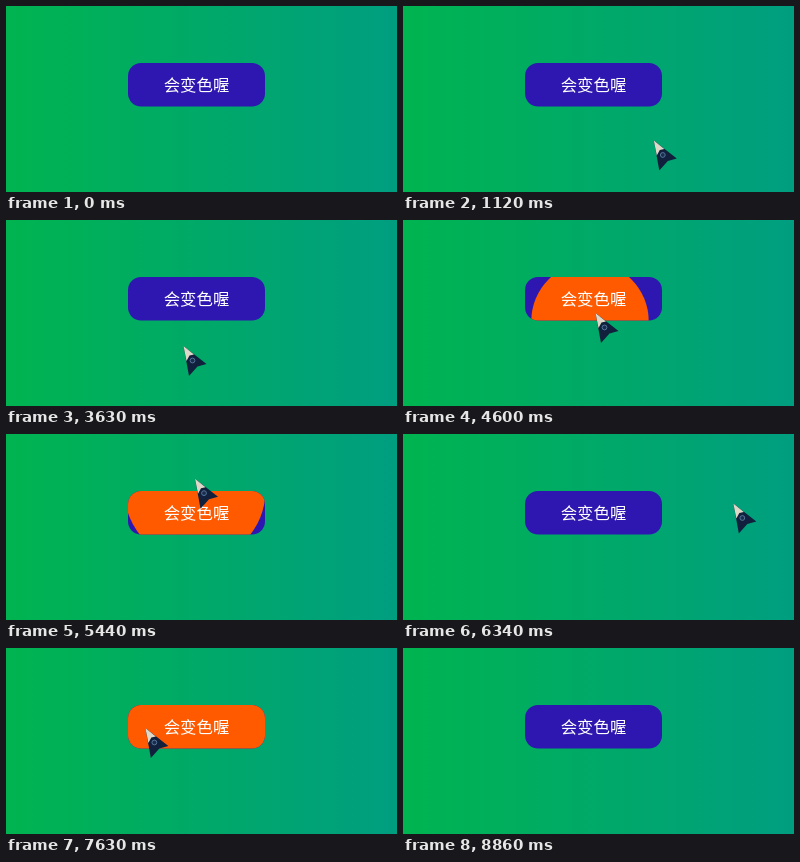
Write an HTML page that moves like this. It is 391 by 186 pixels and loops after 9990 ms.

```html
<!DOCTYPE html>
<html lang="zh">
<head>
<meta charset="utf-8">
<style>
  html, body { margin: 0; width: 100%; height: 100%; overflow: hidden; }
  svg { display: block; width: 391px; height: 186px; }
  text { font: 300 16.4px "Noto Sans CJK SC", "Noto Sans CJK", sans-serif; fill: #fff; text-anchor: middle; }
</style>
</head>
<body>
<svg viewBox="0 0 391 186">
  <defs>
    <linearGradient id="sky">
      <stop offset="0" stop-color="#00b450"/>
      <stop offset="1" stop-color="#009e80"/>
    </linearGradient>
    <clipPath id="pill"><rect x="122" y="57" width="137" height="43.6" rx="13"/></clipPath>
  </defs>
  <rect width="391" height="186" fill="url(#sky)"/>
  <g clip-path="url(#pill)">
    <rect x="122" y="57" width="137" height="44" fill="#2e17b0"/>
    <circle id="ripple" fill="#ff5a00"/>
  </g>
  <text x="190.5" y="85">会变色喔</text>
  <g id="pointer">
    <path d="M-.5 0L22.5 18L13.5 20.5L5 30Z" fill="#11203c"/>
    <path d="M-.5 0L10 8.5L5.5 9.5L2.5 15Z" fill="#ded8c8"/>
    <circle cx="8.5" cy="14.5" r="2.4" fill="#1b2d4d" stroke="#55759a"/>
  </g>
</svg>
<script>
const LOOP = 9990, FADE = 400;
const button = { left: 122, top: 57, right: 259, bottom: 101 };
const RADIUS = (button.right - button.left) * 2.25 / 2;
const ripple = document.getElementById('ripple');
const pointer = document.getElementById('pointer');

// Key points of the pointer tip
const keys = [
  { t: 600, x: 284, y: 192 },
  { t: 1560, x: 226, y: 90 },
  { t: 2510, x: 226, y: 90 },
  { t: 3100, x: 189, y: 101 },
  { t: 3630, x: 178, y: 126 },
  { t: 4100, x: 177, y: 132 },
  { t: 4429, x: 187, y: 101 },
  { t: 4600, x: 193, y: 93 },
  { t: 5230, x: 189, y: 57 },
  { t: 5900, x: 194, y: 26 },
  { t: 6500, x: 359, y: 80 },
  { t: 6920, x: 259, y: 83 },
  { t: 7630, x: 140, y: 80 },
  { t: 8220, x: 60, y: 75 },
  { t: 8860, x: 274, y: 192 }
];

const slope = (a, b, axis) => a && b ? (b[axis] - a[axis]) / (b.t - a.t) : 0;

function tangent(i, axis) {
  const before = slope(keys[i - 1], keys[i], axis);
  const after = slope(keys[i], keys[i + 1], axis);
  return before * after > 0 ? 2 * before * after / (before + after) : 0;
}

// Monotone cubic interpolation
function along(t, axis) {
  const next = keys.findIndex(key => key.t > t);
  if (next < 1) return keys.at(next)[axis];
  const a = keys[next - 1], b = keys[next], span = b.t - a.t;
  const u = (t - a.t) / span, v = 1 - u;
  return v * v * (1 + 2 * u) * a[axis] + u * u * (3 - 2 * u) * b[axis] +
    span * u * v * (v * tangent(next - 1, axis) - u * tangent(next, axis));
}

const tipAt = t => ({ x: along(t, 'x'), y: along(t, 'y') });

const isOver = ({ x, y }) =>
  x >= button.left && x <= button.right && y >= button.top && y <= button.bottom;

// Moments when the pointer enters or leaves the button
function findCrossings() {
  const crossings = [];
  let inside = false;
  for (let t = 0; t < LOOP; t++) {
    const tip = tipAt(t);
    if (isOver(tip) !== inside) {
      inside = !inside;
      crossings.push({ t, inside, ...tip });
    }
  }
  return crossings;
}

// cubic-bezier(.42, 0, .58, 1)
function easeInOut(x) {
  if (x <= 0 || x >= 1) return x <= 0 ? 0 : 1;
  let low = 0, high = 1;
  for (let n = 0; n < 20; n++) {
    const s = (low + high) / 2, v = 1 - s;
    if (1.26 * v * v * s + 1.74 * v * s * s + s ** 3 < x) low = s; else high = s;
  }
  return low * low * (3 - 2 * low);
}

const crossings = findCrossings();

function draw(t) {
  const tip = tipAt(t);
  pointer.setAttribute('transform', `translate(${tip.x} ${tip.y})`);
  const last = crossings.filter(c => c.t <= t).pop();
  let radius = 0;
  if (last) {
    const progress = easeInOut((t - last.t) / FADE);
    radius = RADIUS * (last.inside ? progress : 1 - progress);
    ripple.setAttribute('cx', last.x);
    ripple.setAttribute('cy', last.y);
  }
  ripple.setAttribute('r', radius);
}

const began = performance.now();
function tick() {
  draw((performance.now() - began) % LOOP);
  requestAnimationFrame(tick);
}
tick();
</script>
</body>
</html>
```
